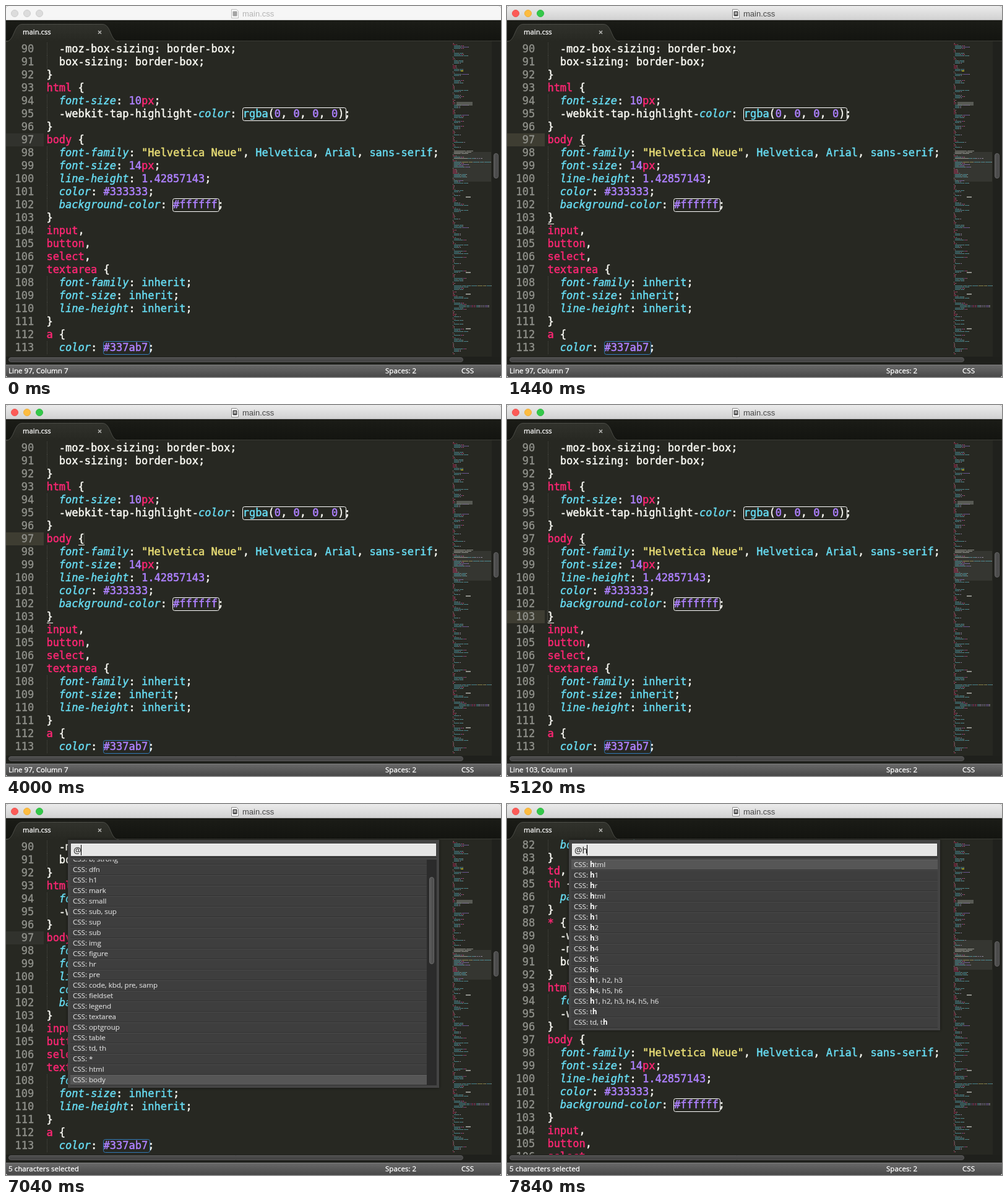
Write an HTML page with a canvas that moves like this. It is 800 by 600 pixels and loops after 8 s.

```html
<!DOCTYPE html>
<html lang="en">
<head>
<meta charset="utf-8">
<title>main.css</title>
<style>
html, body { margin: 0; width: 100%; height: 100%; overflow: hidden; background: #fff; }
canvas { display: block; width: 800px; height: 600px; }
</style>
</head>
<body>
<canvas id="stage" width="800" height="600"></canvas>
<script>
const ctx = document.getElementById('stage').getContext('2d');
const LOOP = 8000, ROW = 21, LEFT = 65.4;
const PINK = '#f92672', CYAN = '#66d9ef', PURPLE = '#ae81ff', YELLOW = '#e6db74', WHITE = '#f8f8f2';
const MONO = '17px "DejaVu Sans Mono", monospace';
const ui = (size, weight = 400) => `${weight} ${size}px "Open Sans", sans-serif`;
ctx.font = MONO;
const CHAR = ctx.measureText('0').width;

const FIRST = 82;
const source = `  border-spacing: 0;
}
td,
th {
  padding: 0;
}
* {
  -webkit-box-sizing: border-box;
  -moz-box-sizing: border-box;
  box-sizing: border-box;
}
html {
  font-size: 10px;
  -webkit-tap-highlight-color: rgba(0, 0, 0, 0);
}
body {
  font-family: "Helvetica Neue", Helvetica, Arial, sans-serif;
  font-size: 14px;
  line-height: 1.42857143;
  color: #333333;
  background-color: #ffffff;
}
input,
button,
select,
textarea {
  font-family: inherit;
  font-size: inherit;
  line-height: inherit;
}
a {
  color: #337ab7;`.split('\n');

// Splits a line of CSS into coloured runs: {text, col, color, italic}
function tokenize(line) {
  const runs = [];
  let col = 0;
  const add = (text, color, italic) => { runs.push({ text, col, color, italic }); col += text.length; };
  const rule = line.match(/^(  )(.*?)(: )(.*)$/);
  if (!rule) {
    for (const part of line.match(/[,{} ]+|[^,{} ]+/g) || []) add(part, /[,{} ]/.test(part) ? WHITE : PINK);
    return runs;
  }
  if (rule[2].includes('box-sizing')) { add(line, WHITE); return runs; }
  add(rule[1], WHITE);
  const [, vendor, name] = rule[2].match(/^(-webkit-tap-highlight-)?(.*)$/);
  if (vendor) add(vendor, WHITE);
  add(name, CYAN, true);
  add(rule[3], WHITE);
  for (const part of rule[4].match(/"[^"]*"|#\w+|[\d.]+|px|[a-z][a-z-]*|[^\w"#]+/gi)) {
    const color = part[0] === '"' ? YELLOW : /^[#\d.]/.test(part) ? PURPLE
      : part === 'px' ? PINK : /^[a-z]/i.test(part) ? CYAN : WHITE;
    add(part, color);
  }
  return runs;
}
const lines = source.map(tokenize);

function rect(x, y, w, h, fill) { ctx.fillStyle = fill; ctx.fillRect(x, y, w, h); }
function round(x, y, w, h, r, fill, stroke) {
  ctx.beginPath();
  ctx.roundRect(x, y, w, h, r);
  if (fill) { ctx.fillStyle = fill; ctx.fill(); }
  if (stroke) { ctx.strokeStyle = stroke; ctx.lineWidth = 1; ctx.stroke(); }
}
// A thin outline of the same colour gives the strokes extra weight
function text(str, x, y, font, fill, weight = 0) {
  ctx.font = font;
  ctx.fillStyle = ctx.strokeStyle = fill;
  ctx.fillText(str, x, y);
  if (weight) {
    ctx.lineWidth = weight;
    ctx.lineJoin = 'round';
    ctx.strokeText(str, x, y);
  }
  return x + ctx.measureText(str).width;
}
function gradient(x0, y0, x1, y1, ...colors) {
  const g = ctx.createLinearGradient(x0, y0, x1, y1);
  colors.forEach((c, i) => g.addColorStop(i / (colors.length - 1), c));
  return g;
}

// The minimap shows the real lines amid generated ones, one pixel per character
function makeMinimapLines() {
  let seed = 11;
  const random = n => (seed = (seed * 16807) % 2147483647) % n;
  const pick = list => list[random(list.length)];
  const names = ['h1', 'pre', 'a', 'img', 'td', 'th', 'b', 'input', 'hr', 'p'];
  const rules = ['margin: 0;', 'color: inherit;', 'display: block;', 'font-size: 14px;', 'border: 0;',
    'line-height: 1.42857143;', 'margin-bottom: 10px;', 'vertical-align: middle;', 'padding: 0;'];
  const all = [];
  while (all.length < 252) {
    for (let i = random(4); i > 0; i--) all.push(pick(names) + ',');
    all.push(pick(names) + ' {');
    for (let i = 1 + random(3); i > 0; i--) all.push('  ' + pick(rules));
    all.push('}');
  }
  all.length = 252;
  source.forEach((line, i) => { all[FIRST - 2 + i] = line; });
  all[196] = '  font-family: Menlo, Monaco, Consolas, "Courier New", monospace;';
  all[212] = all[213] = '          box-shadow: inset 0 1px 1px rgba(0, 0, 0, 0.075);';
  return all.map(tokenize);
}
const minimap = makeMinimapLines();

function drawMinimap(scrolled) {
  rect(722, scrolled ? 220 : 236, 62, 48, '#353631');
  ctx.globalAlpha = 0.5;
  minimap.forEach((runs, i) => {
    for (const { text: str, col, color } of runs) {
      for (const word of str.matchAll(/[^ ]+/g)) {
        const x = 722 + col + word.index;
        rect(x, 60 + i * 2, Math.min(word[0].length, 784 - x), 1, color);
      }
    }
  });
  rect(728, 155, 26, 6, '#8a8b86');
  rect(735, 104, 4, 2, '#ffe600');
  for (const y of [308, 430, 465, 521]) rect(743, y, 8, 2, WHITE);
  ctx.globalAlpha = 1;
}

function drawEditor({ line, scrolled, active, overlay }) {
  const top = n => 59 + (n - 90) * ROW + (scrolled ? 165 : 0);
  ctx.save();
  ctx.beginPath();
  ctx.rect(0, 57, 720, 510);
  ctx.clip();
  if (!scrolled) rect(0, top(line), 61, ROW, active && !overlay ? '#3e3d32' : '#31322d');
  lines.forEach((runs, i) => {
    const n = FIRST + i, y = top(n);
    if (y < 50 || y > 567) return;
    ctx.textAlign = 'right';
    text(n, 45.2, y + 16, MONO, '#8f908a', 0.4);
    ctx.textAlign = 'left';
    if (source[i][0] === ' ') {
      for (let k = 0; k < ROW; k += 2) rect(66, y + k, 1, 1, '#4a4b45');
    }
    for (const run of runs) {
      text(run.text, LEFT + run.col * CHAR, y + 16, (run.italic ? 'italic ' : '') + MONO, run.color, 0.5);
    }
    const swatch = source[i].match(/rgba\(.*\)|#(ffffff|337ab7)/);
    if (swatch) {
      const x = Math.round(LEFT + swatch.index * CHAR);
      round(x - 0.5, y + 0.5, Math.round(swatch[0].length * CHAR) + 3, 21, 3, null,
        swatch[1] === '337ab7' ? '#337ab7' : '#fff');
    }
  });
  if (active && !overlay) {
    rect(117, top(97) + 20, 10, 1, WHITE);
    rect(66, top(103) + 20, 10, 1, WHITE);
  }
  ctx.restore();
}

function drawTitleBar(active) {
  rect(0, 0, 800, 23, active ? gradient(0, 0, 0, 22, '#ebebeb', '#d2d2d2') : '#f6f6f6');
  rect(0, 22, 800, 1, active ? '#b4b4b4' : '#d3d3d3');
  const lights = active ? ['#fc5b57', '#fdbc40', '#34c84a'] : ['#dcdcdc', '#dcdcdc', '#dcdcdc'];
  const rims = active ? ['#ee5450', '#eeae3a', '#2fba42'] : ['#cdcdcd', '#cdcdcd', '#cdcdcd'];
  lights.forEach((c, i) => round(8.5 + i * 20, 6.5, 11, 11, 5.5, c, rims[i]));
  ctx.globalAlpha = active ? 1 : 0.5;
  ctx.beginPath();
  ctx.moveTo(364.5, 5.5); ctx.lineTo(372.5, 5.5); ctx.lineTo(375.5, 8.5);
  ctx.lineTo(375.5, 19.5); ctx.lineTo(364.5, 19.5); ctx.closePath();
  ctx.fillStyle = '#fff'; ctx.fill();
  ctx.strokeStyle = '#8a8a8a'; ctx.lineWidth = 1; ctx.stroke();
  round(366.5, 8.5, 7, 8, 1, '#4b4b4b');
  rect(368, 10, 4, 4, '#aaa');
  ctx.globalAlpha = 1;
  text('main.css', 382, 17, '13px "Liberation Sans", Arial, sans-serif', active ? '#464646' : '#b4b4b4');
}

function drawTabs() {
  rect(0, 23, 800, 34, gradient(0, 23, 0, 57, '#1b1c17', '#131410'));
  rect(0, 56, 800, 1, '#3b3c36');
  ctx.beginPath();
  ctx.moveTo(0, 57.5);
  ctx.bezierCurveTo(14, 57, 12, 29.5, 26, 29.5);
  ctx.lineTo(156, 29.5);
  ctx.bezierCurveTo(170, 29.5, 168, 57, 182, 57.5);
  ctx.fillStyle = gradient(0, 29, 0, 57, '#31322c', '#272822');
  ctx.fill();
  ctx.strokeStyle = '#4c4d47'; ctx.lineWidth = 1; ctx.stroke();
  text('main.css', 27, 46, ui(11.3), '#fff', 0.3);
  ctx.beginPath();
  ctx.moveTo(149, 40); ctx.lineTo(154, 45);
  ctx.moveTo(154, 40); ctx.lineTo(149, 45);
  ctx.strokeStyle = '#b5b5b2'; ctx.lineWidth = 1.5; ctx.stroke();
}

function drawBars({ line, scrolled, overlay }) {
  rect(785, 57, 15, 523, '#20211d');
  round(788.5, scrolled ? 222.5 : 238.5, 7, 40, 3.5, gradient(788, 0, 796, 0, '#565656', '#444'), '#626262');
  rect(0, 567, 800, 13, '#1f201c');
  round(4.5, 568.5, 734, 7, 3.5, gradient(0, 568, 0, 576, '#505050', '#404040'), '#585858');
  rect(0, 580, 800, 20, gradient(0, 580, 0, 600, '#6a6a6a', '#484848'));
  rect(0, 580, 800, 1, '#7c7c7c');
  const status = overlay ? '5 characters selected' : `Line ${line}, Column ${line === 97 ? 7 : 1}`;
  const label = (str, x) => text(str, x, 594, ui(11.6), '#fff', 0.3);
  label(status, 4);
  label('Spaces: 2', 613);
  label('CSS', 736);
}

const symbols = ['b, strong', 'dfn', 'h1', 'mark', 'small', 'sub, sup', 'sup', 'sub', 'img', 'figure', 'hr', 'pre',
  'code, kbd, pre, samp', 'fieldset', 'legend', 'textarea', 'optgroup', 'table', 'td, th', '*', 'html', 'body'];
const matches = ['html', 'h1', 'hr', 'html', 'hr', 'h1', 'h2', 'h3', 'h4', 'h5', 'h6',
  'h1, h2, h3', 'h4, h5, h6', 'h1, h2, h3, h4, h5, h6', 'th', 'td, th'];

function drawOverlay(query, caretAlpha) {
  const filtered = query === '@h';
  const items = filtered ? matches : symbols;
  const selected = filtered ? 0 : symbols.length - 1;
  const bottom = filtered ? 366 : 459;
  const firstRow = filtered ? 90 : 81;
  const right = filtered ? 696 : 680;
  ctx.save();
  ctx.shadowColor = 'rgba(0,0,0,.5)';
  ctx.shadowBlur = 5;
  rect(100, 58, 600, bottom - 58, '#444');
  ctx.restore();
  rect(105, 64, 590, 20, '#e6e6e6');
  ctx.strokeStyle = '#f4f4f4'; ctx.lineWidth = 1;
  ctx.strokeRect(105.5, 64.5, 589, 19);
  rect(104, 86, 592, 1, '#2c2c2c');

  const end = text(query, 109, 80, ui(14), '#1c1c1c');
  ctx.globalAlpha = caretAlpha;
  rect(Math.round(end) - 1, 66, 1, 17, '#000');
  ctx.globalAlpha = 1;

  ctx.save();
  ctx.beginPath();
  ctx.rect(104, 90, 592, bottom - 94);
  ctx.clip();
  items.forEach((name, i) => {
    const y = firstRow + i * 17;
    rect(104, y, right - 104, 17, i === selected ? '#565656' : '#3e3e3e');
    rect(104, y, right - 104, 1, i === selected ? '#606060' : '#4a4a4a');
    rect(104, y + 16, right - 104, 1, '#323232');
    const label = (str, x) => text(str, x, y + 12, ui(11.5), '#d6d6d6', 0.2);
    const x = label('CSS: ', 108);
    const at = filtered ? name.indexOf('h') : -1;
    if (at < 0) {
      label(name, x);
    } else {
      const bold = text('h', label(name.slice(0, at), x), y + 12, ui(11.5, 700), '#fff');
      label(name.slice(at + 1), bold);
    }
  });
  if (!filtered) {
    rect(680, 90, 16, 366, '#2b2b2b');
    round(684.5, 118.5, 7, 140, 3.5, gradient(684, 0, 692, 0, '#5c5c5c', '#4a4a4a'), '#686868');
  }
  ctx.restore();
}

// Each list holds [start time, value] pairs; a value stays until the next one
const FAINT = 0.15;
const cursorLine = [[0, 97], [2560, 103], [3680, 97], [4640, 103], [5600, 97]];
const caretAlpha = [[0, 0], [160, 1], [480, FAINT], [640, 0], [1120, 1], [1280, FAINT], [1440, 0],
  [1920, 1], [2240, FAINT], [2400, 0], [2560, 1], [3040, 0], [3680, 1], [4000, FAINT], [4160, 0],
  [4640, 1], [5120, FAINT], [5280, 0], [5600, 1], [6080, FAINT], [6240, 0], [6720, 1],
  [7360, FAINT], [7520, 0], [7840, 1]];
const valueAt = (track, t) => track.findLast(([start]) => start <= t)[1];

function draw(t) {
  const state = {
    active: t >= 160,
    line: valueAt(cursorLine, t),
    overlay: t >= 7040,
    scrolled: t >= 7840
  };
  const alpha = valueAt(caretAlpha, t);
  ctx.clearRect(0, 0, 800, 600);
  ctx.save();
  ctx.beginPath();
  ctx.roundRect(0, 0, 800, 600, 4);
  ctx.clip();
  rect(0, 0, 800, 600, '#272822');
  drawTitleBar(state.active);
  drawTabs();
  drawEditor(state);
  drawMinimap(state.scrolled);
  drawBars(state);
  if (state.overlay) {
    drawOverlay(state.scrolled ? '@h' : '@', alpha);
  } else {
    ctx.globalAlpha = alpha;
    if (state.line === 97) rect(126, 206, 1, ROW, WHITE);
    else rect(65, 332, 1, ROW, WHITE);
    ctx.globalAlpha = 1;
  }
  ctx.restore();
}

const begin = performance.now();
function tick() {
  draw((performance.now() - begin) % LOOP);
  requestAnimationFrame(tick);
}
tick();
</script>
</body>
</html>
```
